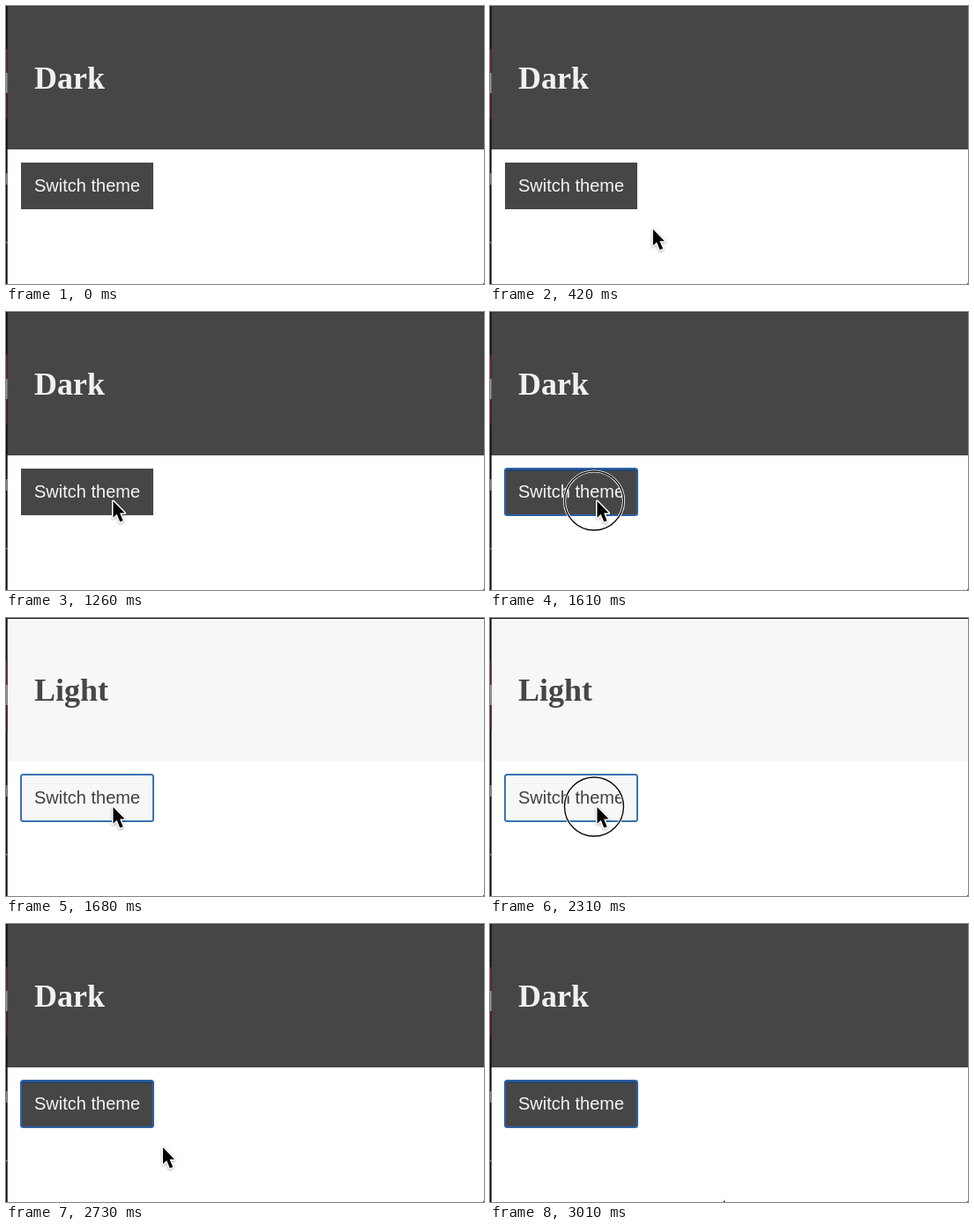
Recreate the animation shown at these times as an HTML page. Size 542x316 px, loop 3080 ms.

```html
<!DOCTYPE html>
<html lang="en">
<head>
<meta charset="utf-8">
<title>Theme switch</title>
<style>
  html, body { margin: 0; width: 100%; height: 100%; overflow: hidden; background: #fff; }
  svg { display: block; width: 542px; height: 316px; }
  .stage { --panel: #464646; --ink: #f5f5f5; --title: #f1f1f1; --top: #393939; --ring: #2d62a8; }
  .stage.light { --panel: #f7f7f7; --ink: #414141; --title: #464646; --top: #1c1c1e; --ring: #3973b1; }
  .panel { fill: var(--panel); }
  .title { font: bold 36px "Liberation Serif", Times, serif; fill: var(--title); }
  .label { font: 20px "Liberation Sans", Arial, sans-serif; fill: var(--ink); }
  .ring { fill: none; stroke: var(--ring); stroke-width: 2; }
  .shade { fill: #23456f; }
  .light .shade { display: none; }
</style>
</head>
<body>
<svg class="stage" id="stage" viewBox="0 0 542 316">
  <rect width="542" height="316" fill="#fff"/>
  <rect class="panel" width="542" height="163"/>
  <rect width="542" height="1" fill="var(--top)"/>
  <g id="edge">
    <rect width="1.7" height="316" fill="#111114"/>
    <rect y="49" width="1.7" height="27" fill="#642b2c"/>
    <rect y="76" width="1.7" height="23" fill="#949494"/>
    <rect y="99" width="1.7" height="29" fill="#561e20"/>
    <rect y="190" width="1.7" height="13" fill="#858588"/>
    <rect y="268" width="1.7" height="2" fill="#77777a"/>
  </g>
  <rect x="541" y="315" width="1" height="1" fill="#333"/>
  <text class="title" id="title" x="32" y="94">Dark</text>

  <rect class="panel" x="17" y="178" width="150" height="53"/>
  <g id="focus">
    <rect class="shade" x="18" y="179" width="148" height="2"/>
    <rect class="ring" x="17" y="178" width="150" height="53" rx="2.5"/>
  </g>
  <text class="label" x="32" y="211">Switch theme</text>

  <g id="press" fill="none">
    <circle cx="118" cy="214.5" r="33.5" stroke="#fff" stroke-width="3.2"/>
    <circle cx="118" cy="214.5" r="33.5" stroke="#0a0a0a" stroke-width="1.4"/>
  </g>
  <g id="cursor">
    <path id="arrow" d="M0 0V18.7L4.2 14.8L7.8 23.6L11.2 22.2L7.6 13.5H13.1Z"
      stroke="#fff" stroke-width="3" stroke-linejoin="round" paint-order="stroke"
      style="filter: drop-shadow(0 1px 1px #0005)"/>
  </g>
</svg>
<script>
  const STEP = 70, STEPS = 44;
  const rest = { x: 121.5, y: 215 };
  const entry = { x: 264, y: 302 };
  const exit = { x: 265, y: 314 };
  const [stage, title, focus, press, cursor] =
    ["stage", "title", "focus", "press", "cursor"].map(id => document.getElementById(id));

  const easeOut = u => 1 - (1 - u) ** 2;
  const easeInOut = u => u * u * (3 - 2 * u);
  const show = (node, on) => node.setAttribute("visibility", on ? "visible" : "hidden");
  const mix = (a, b, u) => ({ x: a.x + (b.x - a.x) * u, y: a.y + (b.y - a.y) * u });

  function cursorAt(step) {
    if (step < 10) return mix(entry, rest, easeOut((step - 4) / 6));
    if (step > 36) return mix(rest, exit, easeInOut((step - 36) / 7));
    return rest;
  }

  function draw(now) {
    const step = Math.floor(now / STEP) % STEPS;
    const light = step >= 24 && step < 34;
    stage.classList.toggle("light", light);
    title.textContent = light ? "Light" : "Dark";
    show(focus, step >= 23);
    show(press, [12, 23, 33].includes(step));
    show(cursor, step >= 4);
    const { x, y } = cursorAt(Math.max(step, 4));
    cursor.setAttribute("transform", `translate(${x} ${y})`);
  }

  let start;
  function tick(now) {
    start ??= now;
    draw(now - start);
    requestAnimationFrame(tick);
  }
  draw(0);
  requestAnimationFrame(tick);
</script>
</body>
</html>
```
